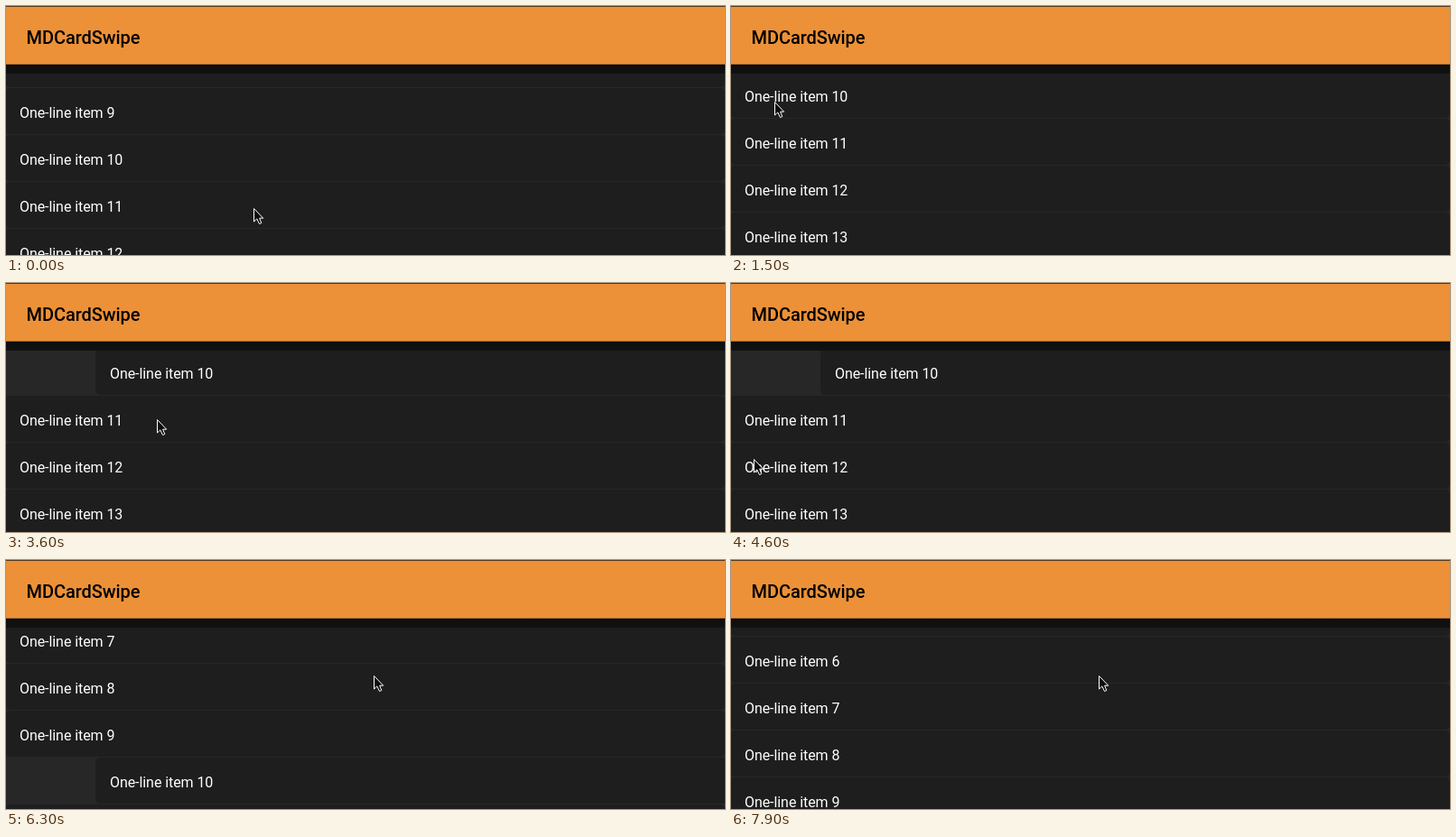
Write an HTML page with a canvas that moves like this. It is 796 px wide and 276 px high and loops after 8 s.

```html
<!DOCTYPE html>
<html lang="en">
<head>
<meta charset="utf-8">
<title>MDCardSwipe</title>
<style>
  html, body { margin: 0; width: 100%; height: 100%; overflow: hidden; background: #121212; }
  canvas { display: block; }
</style>
</head>
<body>
<canvas id="stage" width="796" height="276"></canvas>
<script>
const W = 796, H = 276, LOOP = 8000, STEP = 100;
const LIST_TOP = 75, ROW = 52, OPEN = 100, SETTLE = 200;
const ctx = document.getElementById('stage').getContext('2d');

const flicks = [
  { start: 5900, end: 6400, by: 152 },
  { start: 6500, end: 6800, by: 128 },
  { start: 7700, end: 7900, by: -60 }
];
const home = { x: 274, y: 224 };
const moves = [
  { start: 800, end: 1500, x: 48, y: 106 },
  { start: 2000, end: 2600, x: 354, y: 113, drags: 10 },
  { start: 2600, end: 2800, x: 356, y: 111 },
  { start: 3100, end: 4000, x: 32, y: 180 },
  { start: 4000, end: 4300, x: 25, y: 195 },
  { start: 4600, end: 5200, x: 349, y: 203, drags: 12 },
  { start: 5200, end: 5400, x: 357, y: 188 },
  { start: 5400, end: 5600, x: 407, y: 128 }
];

const smooth = p => p * p * (3 - 2 * p);
const easeOut = p => 1 - (1 - p) ** 2;
const lerp = (a, b, p) => a + (b - a) * p;
const progress = (t, m) => Math.min(1, Math.max(0, (t - m.start) / (m.end - m.start)));

// Middle of item 10: a damped spring settles first, later flicks add to it.
function scroll(t) {
  const s = t / 1000;
  const spring = 70 * Math.exp(-5 * s) * Math.cos(4.36 * s);
  return flicks.reduce((y, f) => y + f.by * easeOut(progress(t, f)), 100 + spring);
}

function pointer(t) {
  let { x, y } = home;
  for (const m of moves) {
    const p = smooth(progress(t, m));
    x = lerp(x, m.x, p);
    y = lerp(y, m.y, p);
  }
  return { x: Math.round(x), y: Math.round(y) };
}

// The card follows the pointer, then eases back to its open position.
function offset(n, t) {
  const drag = moves.find(m => m.drags === n);
  if (!drag || t <= drag.start) return 0;
  const pulled = pointer(Math.min(t, drag.end)).x - pointer(drag.start).x;
  const p = progress(t, { start: drag.end, end: drag.end + SETTLE });
  return Math.round(lerp(pulled, OPEN, Math.sin(p * Math.PI / 2)));
}

function rect(color, x, y, w, h) {
  ctx.fillStyle = color;
  ctx.fillRect(x, y, w, h);
}

function text(str, x, y, font, color) {
  ctx.font = font + ' Roboto, sans-serif';
  ctx.letterSpacing = '-0.07px';
  ctx.fillStyle = color;
  ctx.fillText(str, x, y);
}

function drawRow(n, mid, dx) {
  const top = mid - 27;
  rect('#272727', 0, top, W, ROW);
  ctx.fillStyle = '#1e1e1e';
  ctx.beginPath();
  ctx.roundRect(dx - 1, top, W + 1, ROW - 1, 5);
  ctx.fill();
  text('One-line item ' + n, 15 + dx, mid + 6, '400 16px', '#fff');
}

function drawList(t) {
  ctx.save();
  ctx.beginPath();
  ctx.rect(0, LIST_TOP, W, H - LIST_TOP);
  ctx.clip();
  const base = Math.round(scroll(t));
  for (let n = 0; n < 20; n++) {
    const mid = base + (n - 10) * ROW;
    if (mid > LIST_TOP - 30 && mid < H + 30) drawRow(n, mid, offset(n, t));
  }
  ctx.restore();
}

function drawHeader() {
  const shade = ctx.createLinearGradient(0, 64, 0, LIST_TOP);
  shade.addColorStop(0, 'rgba(0,0,0,.3)');
  shade.addColorStop(1, 'rgba(0,0,0,0)');
  rect(shade, 0, 64, W, LIST_TOP - 64);
  rect('#ec9138', 0, .7, W, 64);
  text('MDCardSwipe', 22.5, 42, '500 20px', '#000');
}

function drawPointer({ x, y }) {
  ctx.save();
  ctx.translate(x + .5, y + .5);
  ctx.beginPath();
  [[0, 0], [0, 14.5], [3.3, 11.4], [6, 17], [8.3, 16], [6.1, 10.7], [10.2, 10.7]]
    .forEach(p => ctx.lineTo(...p));
  ctx.closePath();
  ctx.fillStyle = '#0c0c0c';
  ctx.fill();
  ctx.strokeStyle = '#fff';
  ctx.stroke();
  ctx.restore();
}

function draw(t) {
  rect('#121212', 0, 0, W, H);
  drawList(t);
  drawHeader();
  drawPointer(pointer(t));
}

function tick() {
  const t = performance.now() % LOOP;
  draw(Math.floor(t / STEP) * STEP);
  requestAnimationFrame(tick);
}
tick();
</script>
</body>
</html>
```
